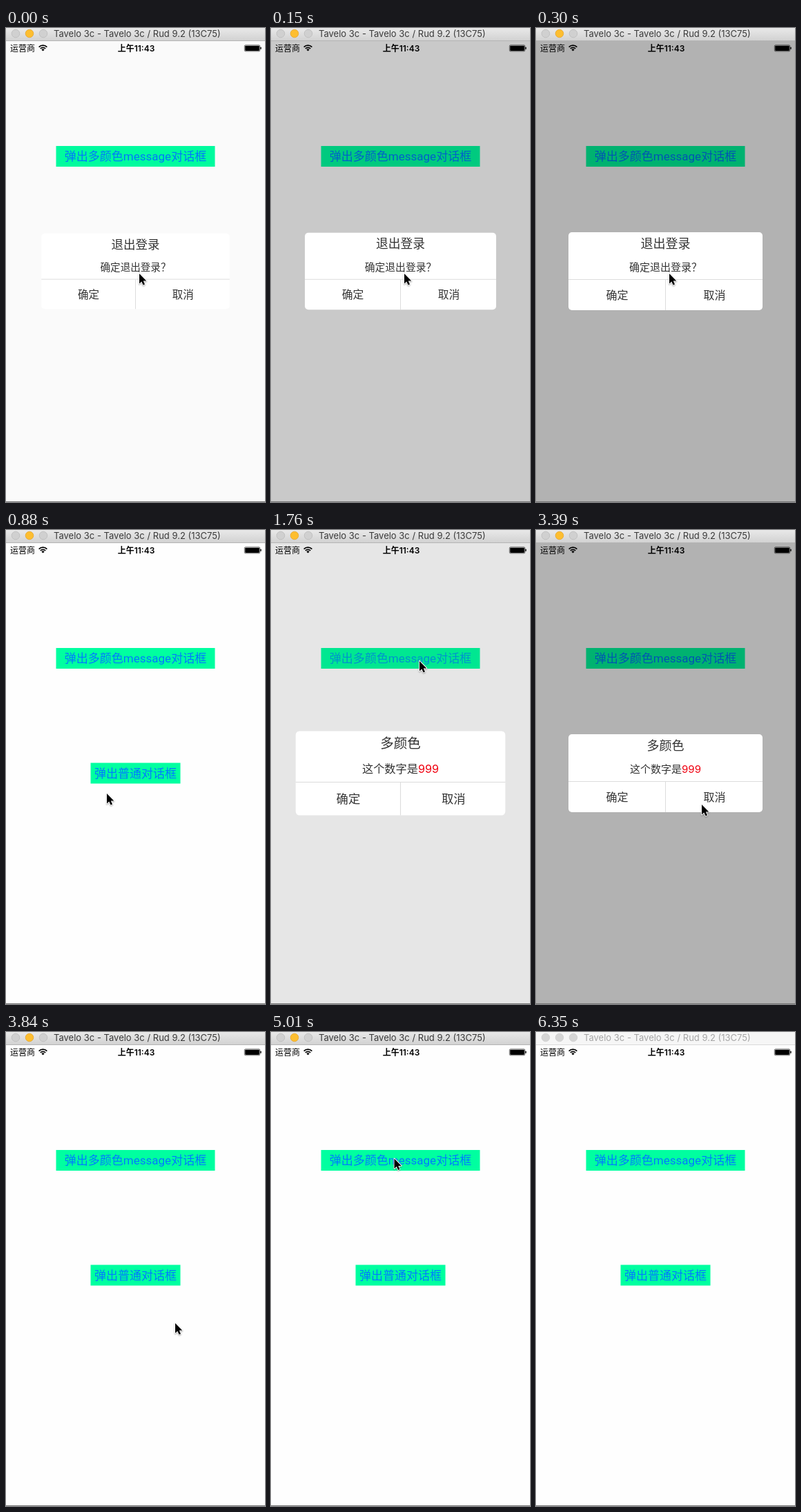
An HTML page with a canvas for the animation above (6.45 s loop, 375 by 687 pixels).

```html
<!DOCTYPE html>
<html lang="zh">
<head>
<meta charset="utf-8">
<title>Dialog demo</title>
<style>
html, body { margin: 0; width: 100%; height: 100%; overflow: hidden; background: #fefefe; }
canvas { display: block; width: 375px; height: 687px; }
</style>
</head>
<body>
<canvas id="stage"></canvas>
<script>
const W = 375, H = 687, LOOP = 6450;
const TICK = 147.6, LEAD = 12;
const CJK = '"Noto Sans CJK SC", "Noto Sans CJK", sans-serif';
const LATIN = 'Inter, ' + CJK;
const LABEL = 'Roboto, ' + CJK;
const INK = '#333';

const canvas = document.getElementById('stage');
const ratio = window.devicePixelRatio || 1;
canvas.width = W * ratio;
canvas.height = H * ratio;
const ctx = canvas.getContext('2d');

// Times below are in ticks, opening age in ms.
const dialogs = [
  { from: 0, to: 5, age: 40, title: '退出登录', parts: [['确定退出登录？', INK]] },
  { from: 12, to: 26, age: 111, title: '多颜色', parts: [['这个数字是', INK], ['999', '#f00010']] }
];

const popKeys = [[0, 0.8], [40, 0.97], [111, 1.08], [200, 0.97], [300, 1]];

const pointerKeys = [
  [0, 193, 356], [2, 193, 356], [4, 138, 386], [5, 139, 386], [6, 146, 382],
  [9, 208, 215], [10, 215, 190], [13, 215, 190], [16, 204, 345], [20, 147, 383],
  [21, 147, 383], [22, 205, 396], [23, 240, 398], [25, 240, 398], [26, 245, 422],
  [28, 200, 560], [30, 150, 300], [32, 75, 7], [33, 61, 37], [35, 296, 330], [36, 250, 640]
];

const smooth = p => { p = Math.min(1, Math.max(0, p)); return p * p * (3 - 2 * p); };

function along(keys, t) {
  let i = 1;
  while (i < keys.length - 1 && keys[i][0] < t) i++;
  const a = keys[i - 1], b = keys[i];
  const p = Math.min(1, Math.max(0, (t - a[0]) / (b[0] - a[0])));
  return a.slice(1).map((v, k) => v + (b[k + 1] - v) * p);
}

function rect(x, y, w, h, color) {
  ctx.fillStyle = color;
  ctx.fillRect(x, y, w, h);
}

function rounded(x, y, w, h, r) {
  ctx.beginPath();
  ctx.roundRect(x, y, w, h, r);
}

// Draws coloured runs on one line, centred on x unless aligned left.
function line(parts, x, y, size, { font = CJK, weight = 400, left = false } = {}) {
  ctx.font = `${weight} ${size}px ${font}`;
  const widths = parts.map(p => ctx.measureText(p[0]).width);
  if (!left) x -= widths.reduce((a, b) => a + b) / 2;
  parts.forEach(([text, color], i) => {
    ctx.fillStyle = color;
    ctx.fillText(text, x, y + size * 0.37);
    x += widths[i];
  });
}

function titleBar(active) {
  const fill = ctx.createLinearGradient(0, 0, 0, 18);
  fill.addColorStop(0, active ? '#e9e9e9' : '#f6f6f6');
  fill.addColorStop(1, active ? '#d2d2d2' : '#f6f6f6');
  rect(0, 0, W, 18, fill);
  rect(0, 18, W, 1, active ? '#b4b4b4' : '#dadada');
  [14, 34, 54].forEach((x, i) => {
    const lit = active && i === 1;
    ctx.beginPath();
    ctx.arc(x, 8, 5.8, 0, Math.PI * 2);
    ctx.fillStyle = lit ? '#fdbe30' : active ? '#d0d0d0' : '#d5d5d5';
    ctx.strokeStyle = lit ? '#e6a52a' : active ? '#bcbcbc' : '#cfcfcf';
    ctx.lineWidth = 0.8;
    ctx.fill();
    ctx.stroke();
  });
  line([['Tavelo 3c - Tavelo 3c / Rud 9.2 (13C75)', active ? '#3a3a3a' : '#a6a6a6']],
    69, 8.5, 13, { font: LATIN, left: true });
}

function statusBar() {
  line([['运营商', '#000']], 6, 29.5, 12, { left: true });
  line([['上午11:43', '#000']], 188.5, 29.5, 12, { font: LATIN, weight: 600 });

  const a = -Math.PI * 0.75, b = -Math.PI * 0.25;
  ctx.strokeStyle = ctx.fillStyle = '#000';
  ctx.lineWidth = 1.7;
  for (const r of [8.3, 5.2]) {
    ctx.beginPath();
    ctx.arc(53.5, 33.5, r, a, b);
    ctx.stroke();
  }
  ctx.beginPath();
  ctx.moveTo(53.5, 33.5);
  ctx.arc(53.5, 33.5, 3, a, b);
  ctx.fill();

  ctx.lineWidth = 0.6;
  rounded(345.3, 24.8, 22.4, 9, 1.6);
  ctx.stroke();
  ctx.fillStyle = '#000';
  rounded(346.2, 25.7, 20.6, 7.2, 0.8);
  ctx.fill();
  rounded(368.2, 27.6, 1.4, 3.4, 0.7);
  ctx.fill();
}

function button(text, x, y, w, alpha) {
  rect(x, y, w, 30, '#00ffa0');
  ctx.globalAlpha = alpha;
  line([[text, '#007aff']], x + w / 2 , y + 15, 17, { font: LABEL });
  ctx.globalAlpha = 1;
}

function dialog(d, tick) {
  const age = d.age + (tick - d.from) * TICK;
  const scale = along(popKeys, age)[0];
  rect(0, 19, W, H - 20, `rgba(0,0,0,${0.302 * smooth(age / 300)})`);

  ctx.save();
  ctx.translate(187.5, 352.5);
  ctx.scale(scale, scale);
  ctx.translate(-187.5, -352.5);
  ctx.fillStyle = '#fff';
  rounded(47, 296, 281, 113, 5);
  ctx.fill();
  rect(47, 364, 281, 1, '#dcdcdc');
  rect(187, 365, 1, 44, '#dcdcdc');
  line([[d.title, INK]], 187.5, 312, 18);
  line(d.parts, 187.5, 346.5, 15, { font: LATIN });
  line([['确定', INK]], 117.5, 387, 16);
  line([['取消', INK]], 258.5, 387, 16);
  ctx.restore();
}

function pointer(x, y) {
  ctx.save();
  ctx.translate(x, y);
  ctx.beginPath();
  [[0, 0], [0, 14.5], [3.3, 11.4], [5.6, 16.5], [8, 15.5], [5.8, 10.5], [10.3, 10.4]]
    .forEach(p => ctx.lineTo(...p));
  ctx.closePath();
  ctx.lineJoin = 'round';
  ctx.shadowColor = 'rgba(0,0,0,0.35)';
  ctx.shadowBlur = 2 * ratio;
  ctx.shadowOffsetY = ratio;
  ctx.strokeStyle = '#fff';
  ctx.lineWidth = 1.8;
  ctx.stroke();
  ctx.shadowColor = 'transparent';
  ctx.fillStyle = '#000';
  ctx.fill();
  ctx.restore();
}

function draw(t) {
  const tick = Math.floor((t + LEAD) / TICK);
  const pressed = { 11: 0.25, 12: 0.7 }[tick] || 1;
  ctx.setTransform(ratio, 0, 0, ratio, 0, 0);
  rect(0, 0, W, H, '#fefefe');
  statusBar();
  button('弹出多颜色message对话框', 72.5, 171, 230, pressed);
  button('弹出普通对话框', 122.5, 337.5, 130, 1);
  const open = dialogs.find(d => tick >= d.from && tick < d.to);
  if (open) dialog(open, tick);
  rect(0, 686, W, 1, '#777');
  titleBar(t < 6350);
  if (tick < 37) pointer(...along(pointerKeys, tick));
}

const start = performance.now();
function loop() {
  draw((performance.now() - start) % LOOP);
  requestAnimationFrame(loop);
}
loop();
</script>
</body>
</html>
```
